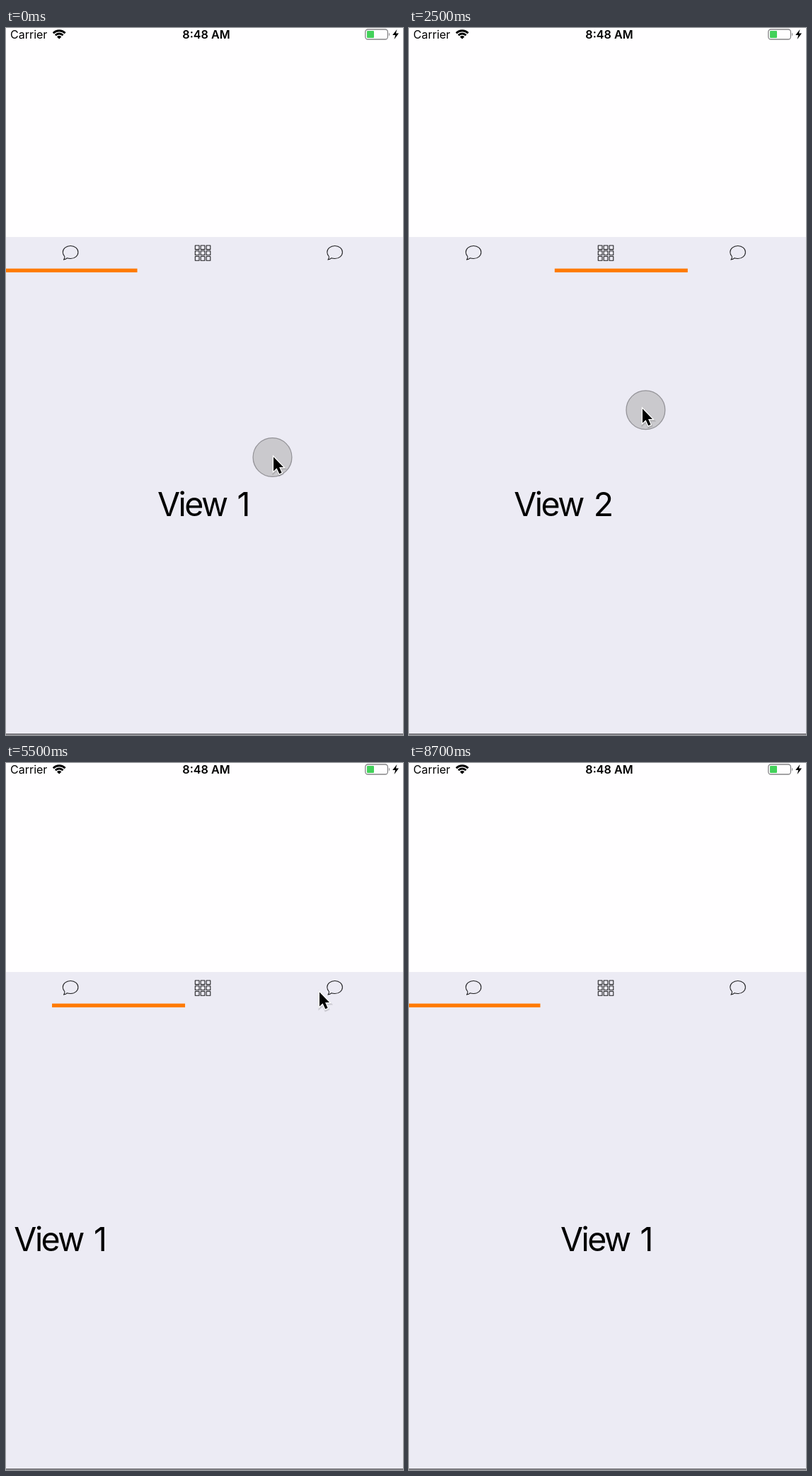
Animation of 561x998 px, one loop 8.8 s. Source, as an HTML page:

```html
<!DOCTYPE html>
<html lang="en">
<head>
<meta charset="utf-8">
<title>Swipeable tabs</title>
<style>
  html, body { margin: 0; height: 100%; overflow: hidden; background: #fffeff; }
  svg { display: block; width: 100vw; height: 100vh; }
  text { font-family: Inter, "Open Sans", sans-serif; font-optical-sizing: none; }
  .status { font-size: 16px; }
  .time { font-size: 16.2px; font-weight: 600; text-anchor: middle; }
  .view { font-size: 46.5px; letter-spacing: -.055em; word-spacing: .1em; text-anchor: middle; }
  .line { fill: none; stroke: #1c1c1e; stroke-width: 1.05; stroke-linejoin: round; }
</style>
</head>
<body>
<svg viewBox="0 0 561 998">
  <defs>
    <path id="bubble" class="line" d="M-9.5 9.6 Q-7.6 7 -8.2 5 C-10 3 -10.7 1 -10.7 -1 C-10.7 -6 -6 -10 .2 -10 C6.4 -10 10.9 -6 10.9 -1 C10.9 4 6.4 8 .2 8 Q-2.4 8 -4.6 7.2 Q-6.4 9.2 -9.5 9.6 Z"/>
    <path id="pointer" d="M1 2.5 V22.5 L5.6 18.2 L9.3 26.3 L12.6 24.8 L9.1 17 H15 Z"/>
  </defs>

  <text class="status" x="6" y="15">Carrier</text>
  <g transform="translate(75.2 15.6)">
    <path d="M-8.4 -8.4 A11.9 11.9 0 0 1 8.4 -8.4 M-5.4 -5.4 A7.7 7.7 0 0 1 5.4 -5.4" fill="none" stroke="#000" stroke-width="2.8"/>
    <path d="M0 0 L-3.2 -3.2 A4.5 4.5 0 0 1 3.2 -3.2 Z"/>
  </g>
  <text class="time" x="283" y="15">8:48 AM</text>
  <rect x="507.8" y="2" width="31.6" height="14" rx="3.5" fill="none" stroke="#858487" stroke-width="1.3"/>
  <rect x="510" y="4" width="10" height="10" rx="1" fill="#43d15a"/>
  <path d="M541 6.5 Q543.4 9 541 11.5 Z" fill="#858487"/>
  <path d="M552.4 2 L546.2 10 H550.2 L548.6 16 L555 7.6 H551 Z"/>

  <rect y="295" width="561" height="703" fill="#ecebf4"/>
  <use href="#bubble" x="91" y="317.5"/>
  <g id="grid" class="line"></g>
  <use href="#bubble" x="464.5" y="317.5"/>
  <rect id="bar" y="339.6" width="188" height="5.3" fill="#ff7a00"/>
  <g id="pages"></g>
  <rect y="996" width="561" height="1.6" fill="#5b5a5e"/>

  <circle id="touch" r="27.4" fill="#cac9cd" stroke="#959499" stroke-width="1.3"/>
  <g id="arrow">
    <use href="#pointer" x=".5" y="1.5" fill="none" stroke="#0002" stroke-width="4"/>
    <use href="#pointer" stroke="#fff" stroke-width="2.6" paint-order="stroke"/>
  </g>
</svg>
<script>
const LOOP = 8800, STEP = 100, PAGE = 564, TAB = 188, SLOP = 15, HIDE = 8300;
const $ = id => document.getElementById(id);

const tap = (press, release, x, y, page) =>
  ({ press, release, from: [x, y], to: [x, y], page, settle: 296 });
const drag = (press, release, from, to, page) =>
  ({ press, release, from, to, page, settle: 430 });
const hover = (time, x, y, page) => tap(time, time, x, y, page);

// Each gesture ends on the given page
const gestures = [
  drag(200, 1350, [377, 603], [47, 540], 1),
  drag(2200, 3050, [405, 551], [139, 495], 2),
  hover(3500, 84, 389, 2),
  tap(3700, 3820, 278, 312, 1),
  tap(4500, 4620, 92, 332, 0),
  tap(5300, 5420, 442, 321, 2),
  tap(6200, 6380, 294, 314, 1),
  hover(6700, 261, 434, 1),
  drag(7150, 7560, [130, 490], [480, 550], 0),
  hover(8200, 528, 566, 0)
];

function ease(t, start, end) {
  const u = Math.min(1, Math.max(0, (t - start) / (end - start || 1)));
  return u * u * (3 - 2 * u);
}
const mix = (a, b, u) => a + (b - a) * u;

// Gesture under way or last begun
const current = t => Math.max(0, gestures.findLastIndex(g => t >= g.press));

function pointerAt(t) {
  const i = current(t), g = gestures[i], next = gestures[i + 1];
  if (t < g.release || !next) {
    const u = ease(t, g.press, g.release);
    return g.from.map((v, n) => mix(v, g.to[n], u));
  }
  const u = ease(t, g.release + 100, next.press);
  return g.to.map((v, n) => mix(v, next.from[n], u));
}

function pageAt(t) {
  const i = current(t), g = gestures[i];
  const start = i ? gestures[i - 1].page : 0;
  const moved = pointerAt(Math.min(t, g.release - 1))[0] - g.from[0];
  const pulled = Math.sign(moved) * Math.max(0, Math.abs(moved) - SLOP);
  return mix(start - pulled / PAGE, g.page, ease(t, g.release, g.release + g.settle));
}

function place(el, x, y) {
  el.setAttribute("transform", `translate(${x} ${y})`);
}

function draw(now) {
  const t = Math.floor(now % LOOP / STEP) * STEP;
  const page = pageAt(t);
  $("bar").setAttribute("x", TAB * page - 2.5);
  place($("pages"), -PAGE * page, 0);
  place($("arrow"), ...pointerAt(t));
  // The touch ring trails the pointer a little
  const [x, y] = pointerAt(t - 14);
  place($("touch"), x - .5, y + 3);
  const pressed = t < gestures[0].release || t < gestures[current(t)].release;
  $("touch").style.display = pressed ? "" : "none";
  $("arrow").style.display = t < HIDE ? "" : "none";
}

function add(parent, tag, attrs, text = "") {
  const el = document.createElementNS("http://www.w3.org/2000/svg", tag);
  for (const key in attrs) el.setAttribute(key, attrs[key]);
  el.textContent = text;
  $(parent).append(el);
}

for (let i = 0; i < 9; i++) {
  add("grid", "rect", {
    x: 267.3 + i % 3 * 7.9, y: 306.9 + Math.floor(i / 3) * 7.8, width: 5.7, height: 5.7
  });
}
for (let i = 0; i < 3; i++) {
  add("pages", "text", { class: "view", x: 278.5 + i * PAGE, y: 689 }, `View ${i + 1}`);
}

const begin = performance.now();
function frame() {
  draw(performance.now() - begin);
  requestAnimationFrame(frame);
}
frame();
</script>
</body>
</html>
```
